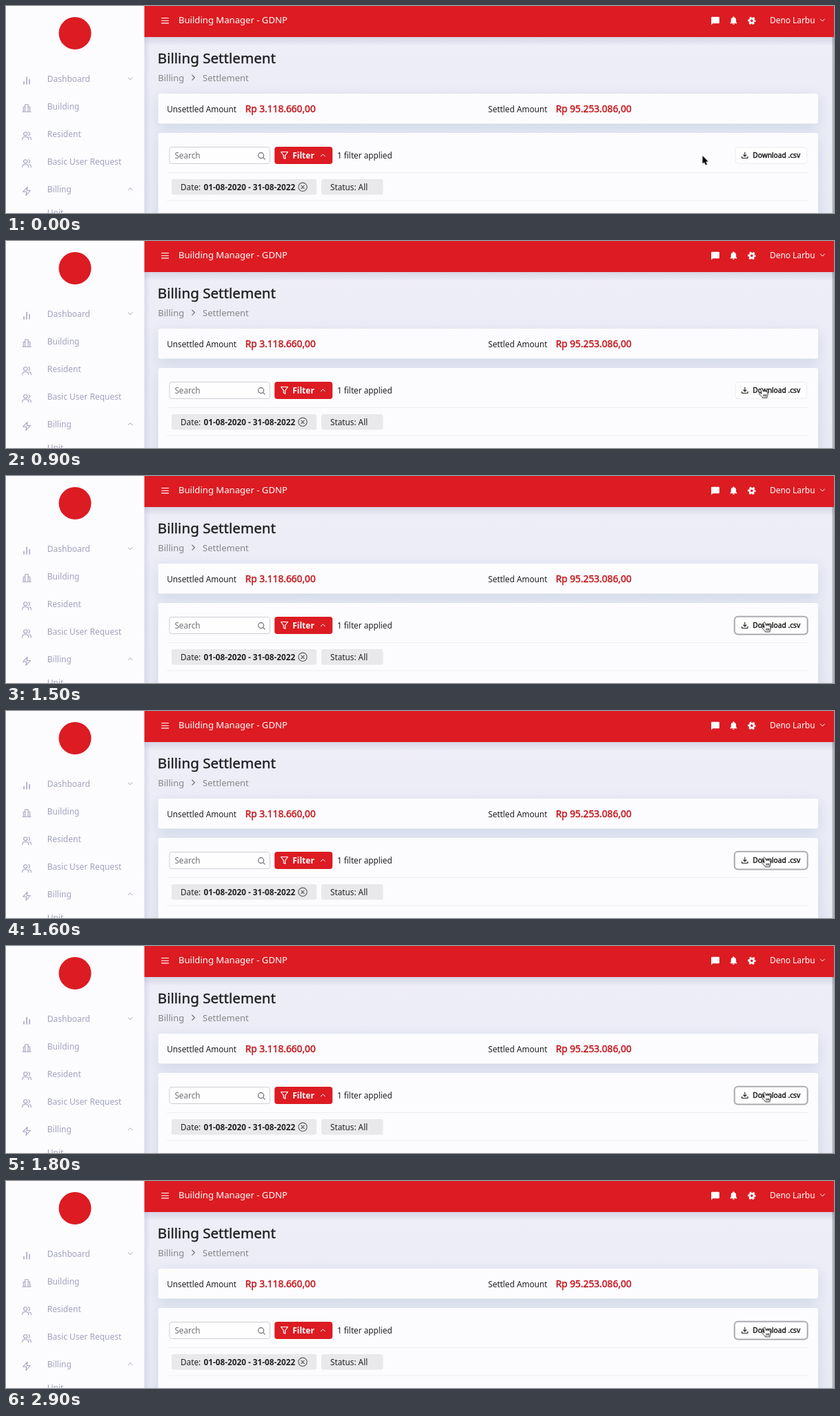
Animation, 1200 px wide and 300 px high, one loop 3000 ms. Source, as an HTML page:

```html
<!DOCTYPE html>
<html lang="en">
<head>
<meta charset="utf-8">
<title>Billing Settlement</title>
<style>
  html, body { margin: 0; width: 100%; height: 100%; overflow: hidden; background: #eeeef8; }
  svg { display: block; width: 1200px; height: 300px; font: 11.75px "Noto Sans", sans-serif; }
  text { white-space: pre; }
  .line { fill: none; stroke: currentColor; stroke-linecap: round; stroke-linejoin: round; }
  .card { fill: #fcfcfe; filter: drop-shadow(0 5px 9px rgba(140, 162, 196, .3)); }
  .bold { font-weight: 700; }
  /* weights between regular and bold: regular with a thin outline */
  .title { font-size: 20.6px; fill: #1d1d20; stroke: #1d1d20; stroke-width: .35; }
  .money { font-size: 13.7px; fill: #c41c22; stroke: #c41c22; stroke-width: .5; }
  .download { font-size: 10.2px; fill: #151517; stroke: #151517; stroke-width: .4; }
  .crumb { font-size: 13px; fill: #85858a; color: #77777c; }

  .menu { font-size: 12px; fill: currentColor; color: #a2a3bf; animation: menu 3s step-end infinite; }
  .cursor { animation: travel 3s step-end infinite; }
  .arrow { animation: arrow 3s step-end infinite; }
  .hand { animation: hand 3s step-end infinite; }
  .ring { animation: ring 3s step-end infinite; }
  .wait { animation: wait 3s step-end infinite; }

  @keyframes travel {
    0% { transform: translate(1009.5px, 217px); }
    3.33% { transform: translate(1011.8px, 217px); }
    6.66% { transform: translate(1018px, 217px); }
    10% { transform: translate(1027.4px, 217px); }
    13.33% { transform: translate(1039px, 217px); }
    16.66% { transform: translate(1053px, 217px); }
    20% { transform: translate(1064.5px, 216px); }
    23.33% { transform: translate(1076.5px, 215px); }
    26.66% { transform: translate(1087px, 214px); }
    30% { transform: translate(1096px, 213.2px); }
    33.33% { transform: translate(1098.5px, 212.4px); }
    36.66%, 100% { transform: translate(1100px, 211.7px); }
  }
  @keyframes arrow {
    0%, 56.66% { opacity: 1; }
    20%, 60%, 100% { opacity: 0; }
  }
  @keyframes hand {
    0%, 56.66% { opacity: 0; }
    20%, 60%, 100% { opacity: 1; }
  }
  @keyframes ring {
    0% { opacity: 0; }
    46.66%, 100% { opacity: 1; }
  }
  @keyframes wait {
    0%, 60%, 100% { opacity: 0; }
    56.66% { opacity: 1; }
  }
  @keyframes menu {
    0%, 60%, 100% { color: #a2a3bf; }
    56.66% { color: #9596b3; }
  }
</style>
</head>
<body>
<svg viewBox="0 0 1200 300">
  <defs>
    <linearGradient id="page" x2="0" y2="1">
      <stop offset="0" stop-color="#efeef9"/>
      <stop offset="1" stop-color="#e9ebf5"/>
    </linearGradient>
    <linearGradient id="below" x2="0" y2="1">
      <stop offset="0" stop-color="#505078" stop-opacity=".15"/>
      <stop offset="1" stop-color="#505078" stop-opacity="0"/>
    </linearGradient>
    <linearGradient id="side">
      <stop offset="0" stop-color="#50508c" stop-opacity=".13"/>
      <stop offset="1" stop-color="#50508c" stop-opacity="0"/>
    </linearGradient>
    <g id="people" class="line" stroke-width="1.1">
      <circle cx="-1.8" cy="-3" r="2.6"/>
      <path d="M-6.2 5.5V4.3a2.9 2.9 0 0 1 2.9-2.9h3a2.9 2.9 0 0 1 2.9 2.9V5.5M2.6 -5.5a2.6 2.6 0 0 1 0 5M4.2 1.6a2.9 2.9 0 0 1 2.1 2.8V5.5"/>
    </g>
    <path id="chevron" class="line" d="M-3 -1.5L0 1.5 3 -1.5"/>
  </defs>

  <rect x="200" width="1000" height="300" fill="url(#page)"/>

  <text class="title" x="219.8" y="83">Billing Settlement</text>
  <g class="crumb">
    <text x="220.3" y="109">Billing</text>
    <path class="line" stroke-width="1.3" d="M269.8 100.2l3.6 3.6-3.6 3.6"/>
    <text x="285" y="109">Settlement</text>
  </g>

  <rect class="card" x="220.5" y="127" width="956.5" height="43.5" rx="3"/>
  <g fill="#202023">
    <text x="233.2" y="153.5">Unsettled Amount</text>
    <text x="698.7" y="153.5">Settled Amount</text>
  </g>
  <g class="money">
    <text x="346.8" y="154.3">Rp 3.118.660,00</text>
    <text x="796.8" y="154.3">Rp 95.253.086,00</text>
  </g>

  <rect class="card" x="220.5" y="184" width="956.5" height="140" rx="3"/>
  <path d="M233 241.5H1164M233 282H1164" stroke="#efeff3"/>

  <rect x="237" y="204.5" width="145.5" height="24" rx="3" fill="#fefefe" stroke="#cfcfd5"/>
  <text x="244.4" y="221" fill="#707076">Search</text>
  <g class="line" color="#66666c" stroke-width="1.1">
    <circle cx="369.6" cy="216.6" r="4"/>
    <path d="M372.6 219.6l2.6 2.6"/>
  </g>

  <rect x="389.2" y="204" width="84" height="25" rx="4" fill="#dc1b22"/>
  <g color="#fff" fill="#fff">
    <path class="line" stroke-width="1.2" d="M398.5 211.5h10l-3.8 4.8v5.2l-2.4-1.4v-3.8z"/>
    <text class="bold" x="415.2" y="220.8" font-size="12">Filter</text>
    <use href="#chevron" transform="translate(459.3 216.3) scale(1 -1)"/>
  </g>
  <text x="480" y="220.8" fill="#202023">1 filter applied</text>

  <rect x="1057" y="204.7" width="103.5" height="23.6" rx="4" fill="#fefefe" stroke="#ececf0"/>
  <rect class="ring" x="1055.7" y="203.6" width="106" height="26" rx="5" fill="none" stroke="#a6a6aa" stroke-width="1.8"/>
  <path class="line" color="#222" stroke-width="1.1" d="M1070.8 212v5.8M1068.6 215.8l2.2 2.2 2.2-2.2M1066.6 218.2v2.3h8.4v-2.3"/>
  <text class="download" x="1082.3" y="220.1">Download .csv</text>

  <g fill="#e9e9ec">
    <rect x="240" y="251" width="210" height="22.5" rx="3"/>
    <rect x="457" y="251" width="89.5" height="22.5" rx="3"/>
  </g>
  <g fill="#202023">
    <text x="253" y="266.6">Date:</text>
    <text class="bold" x="286.6" y="266.6">01-08-2020 - 31-08-2022</text>
    <text x="470" y="266.6">Status: All</text>
  </g>
  <g class="line" color="#5c5c62" stroke-width="1.1">
    <circle cx="430" cy="262.3" r="6.2"/>
    <path d="M427.8 260.1l4.4 4.4M432.2 260.1l-4.4 4.4"/>
  </g>
  <rect x="1197.5" y="45" width="2.5" height="255" fill="#b4b4bd"/>

  <g class="wait">
    <rect x="200" y="44" width="1000" height="256" fill="#fcfbfd" fill-opacity=".75"/>
    <circle cx="596.5" cy="262.5" r="14.5" fill="#dc1b22"/>
    <text x="565" y="294" fill="#1d1d20">please wait...</text>
  </g>

  <rect x="200" y="45" width="1000" height="13" fill="url(#below)"/>
  <rect x="200" y="45" width="9" height="255" fill="url(#side)"/>
  <rect x="200" width="1000" height="45" fill="#dc1b22"/>
  <g fill="#fff" color="#fff">
    <path class="line" stroke-width="1.1" d="M225.5 17.5h10M225.5 21.2h10M225.5 24.9h10"/>
    <text x="250" y="25" font-size="13.1">Building Manager - GDNP</text>
    <path d="M1023.3 15.7h9.4a1.2 1.2 0 0 1 1.2 1.2v7.2a1.2 1.2 0 0 1-1.2 1.2h-8.2l-2.4 2.3V16.9a1.2 1.2 0 0 1 1.2-1.2z"/>
    <path d="M1054.4 15.2a.9.9 0 0 1 .9.9v.4c1.9.4 2.8 2 2.8 3.8v3l1.2 1.3v.6h-9.8v-.6l1.2-1.3v-3c0-1.8.9-3.4 2.8-3.8v-.4a.9.9 0 0 1 .9-.9zM1053.1 25.8h2.6a1.3 1.3 0 0 1-2.6 0z"/>
    <g transform="translate(1080.8 21.3)" fill="none" stroke="#fff">
      <circle r="3.1" stroke-width="2.6"/>
      <circle r="4.9" stroke-width="1.8" stroke-dasharray="2.8 2.33" stroke-dashoffset="1.4"/>
    </g>
    <text x="1107" y="25" font-size="11.9">Deno Larbu</text>
    <use href="#chevron" transform="translate(1183.3 20.5)"/>
  </g>

  <rect width="200.5" height="300" fill="#fcfbfe"/>
  <circle cx="100" cy="39.5" r="23.5" fill="#dc1b22"/>
  <g class="menu">
    <text x="59.8" y="109.6">Dashboard</text>
    <text x="59.8" y="149.8">Building</text>
    <text x="59.8" y="189.8">Resident</text>
    <text x="59.8" y="229.8">Basic User Request</text>
    <text x="59.8" y="269.8">Billing</text>
    <text x="59.8" y="304.4">Unit</text>
    <use href="#chevron" transform="translate(180 105.2)"/>
    <use href="#chevron" transform="translate(180 265.2) scale(1 -1)"/>
    <g class="line" stroke-width="1.1">
      <path d="M26 109.5v3.5M30 103.2v9.8M34 106.5v6.5" stroke-width="1.5"/>
      <path d="M24 153.3h12M25.3 153.3v-7h2.4M27.7 153.3v-10.5h4.4v10.5M32.1 146.3h2.6v7"/>
      <path d="M31 262.4l-6.3 6.8h5l-.7 5.2 6.3-6.9h-5z"/>
    </g>
    <use href="#people" x="30" y="188.3"/>
    <use href="#people" x="30" y="228.3"/>
  </g>

  <g class="cursor" stroke-linejoin="round">
    <path class="arrow" d="M0 0V11.6L2.6 9.2 4.4 13.4 6.5 12.5 4.7 8.4H8.2z" fill="#000" stroke="#fff" stroke-width=".9" paint-order="stroke"/>
    <path class="hand" d="M-2.2 1.9C-2.6 .4-.3-.3.3 1.2L1.6 5C1.7 3.8 3.7 3.7 4 5 4.5 4.1 6 4.3 6.2 5.5 6.9 5 8 5.5 8 6.6V9.6C8 11.2 7 12 6.8 14H.5C0 12.2-2 11.2-4.4 8.5-5.2 7.2-3.7 6.2-2.5 7.1L-1 8.3zM2 9v3M3.9 9v3M5.7 9v3" fill="#fff" stroke="#111" stroke-width=".95"/>
  </g>
</svg>
</body>
</html>
```
